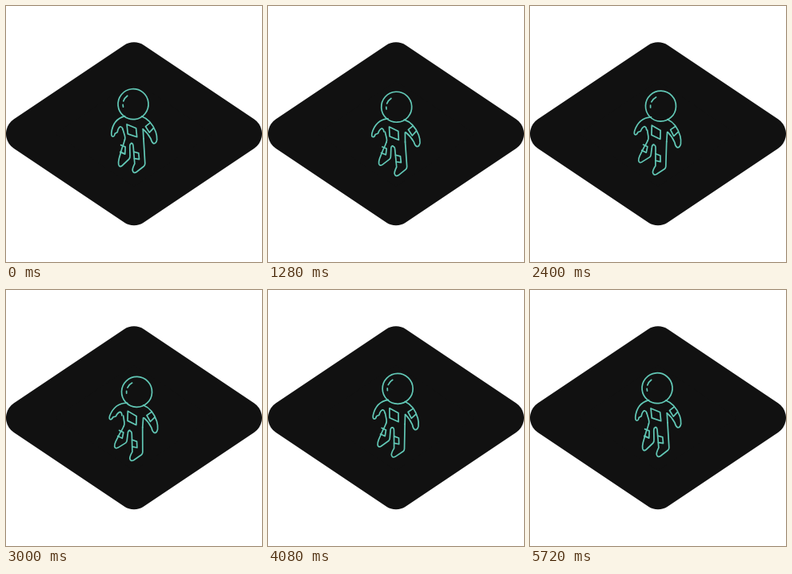
These frames come from a looping animation (320x320 px, 5.76 s). An HTML page:

```html
<!DOCTYPE html>
<html lang="en">
<head>
<meta charset="utf-8">
<title>Floating astronaut</title>
<style>
  html, body { margin: 0; height: 100%; overflow: hidden; background: #fff; }
  svg { display: block; width: 100%; height: 100%; }
  path, circle { stroke-linecap: round; stroke-linejoin: round; }
  #badge { fill: #111; stroke: #111; stroke-width: 44; }
  #body { fill: none; stroke: #62c8b6; stroke-width: 1.7; }
</style>
</head>
<body>
<svg viewBox="0 0 320 320">
  <path id="badge" d="M22 159.7L160 67.2L298 159.7L160 252.2Z"/>
  <g id="body">
    <circle cx="162.5" cy="122.7" r="19"/>
    <path d="M150.7 117.7Q152.5 113.8 156.3 111.6M149.7 124.8L149.6 122"/>
    <path d="M146.5 153L148 161Q148.5 164 147.5 166M171.5 155L171 167"/>
    <path d="M152 147L163 153V164L152 159Z"/>
    <g id="leftArm">
      <path d="M150.5 136.5C141 138 134 145 131.7 156Q131.2 160.5 133.2 160.5Q135.3 160.3 136 157L139.3 155.5Q140.5 150.5 143.5 149Q146 149.5 146.5 153"/>
    </g>
    <g id="rightArm">
      <path d="M171.5 139C179 142.5 184 149 187 160Q188.2 165 187.5 170Q186 175 183 174.3Q180.5 172.5 180 168Q176.5 160 171.5 155"/>
      <path d="M181.3 148L175 152L179 160L184.7 155"/>
    </g>
    <g id="leftLeg">
      <path d="M147.5 166Q146 170 143 175L138 186Q136.5 189.5 136.7 192.5Q137.5 196 141 194L150.5 187.5Q152 186 152 184L152.8 175Q153 171 155.3 171"/>
      <path d="M142 171.5L147.3 174L146 181.7L140.3 179"/>
    </g>
    <g id="rightLeg">
      <path d="M171 167L169.7 198Q169.5 200 168 201.2L158 207.5Q154 209.5 153.3 205Q153.5 202 156.8 197L157.2 176Q157.5 171 155.3 171"/>
      <path d="M157.2 182L163 184.3V192L157 190.5"/>
    </g>
  </g>
</svg>
<script>
  const LOOP = 5760, STEP = 40;
  const part = id => document.getElementById(id);
  const [body, leftArm, rightArm, leftLeg, rightLeg] =
    ["body", "leftArm", "rightArm", "leftLeg", "rightLeg"].map(part);
  const set = (el, value) => el.setAttribute("transform", value);

  // Eased 0 -> 1 -> 0 once per period
  const wave = (t, period) => (1 - Math.cos(2 * Math.PI * t / period)) / 2;
  const smooth = x => x * x * (3 - 2 * x);

  function draw(now) {
    const t = Math.floor(now % LOOP / STEP) * STEP;
    const sway = smooth(wave(t, LOOP));
    const bob = wave(t, LOOP / 3);
    const lift = 1 - (1 - sway) * (1 - bob);

    set(body, `translate(0 ${4.8 * bob}) rotate(${7.5 * sway - 5.8} 160.5 157)`);
    set(leftArm, `rotate(${9 * bob} 148 141)`);
    set(rightArm, `rotate(${-5.5 * bob} 172 143)`);
    set(leftLeg, `translate(0 168) scale(1 ${1 + 0.18 * (0.8 - lift)}) translate(0 -168)`);
    set(rightLeg, `rotate(${-4.5 * bob} 168 167)`);
  }

  const start = performance.now();
  function tick() {
    draw(performance.now() - start);
    requestAnimationFrame(tick);
  }
  tick();
</script>
</body>
</html>
```
